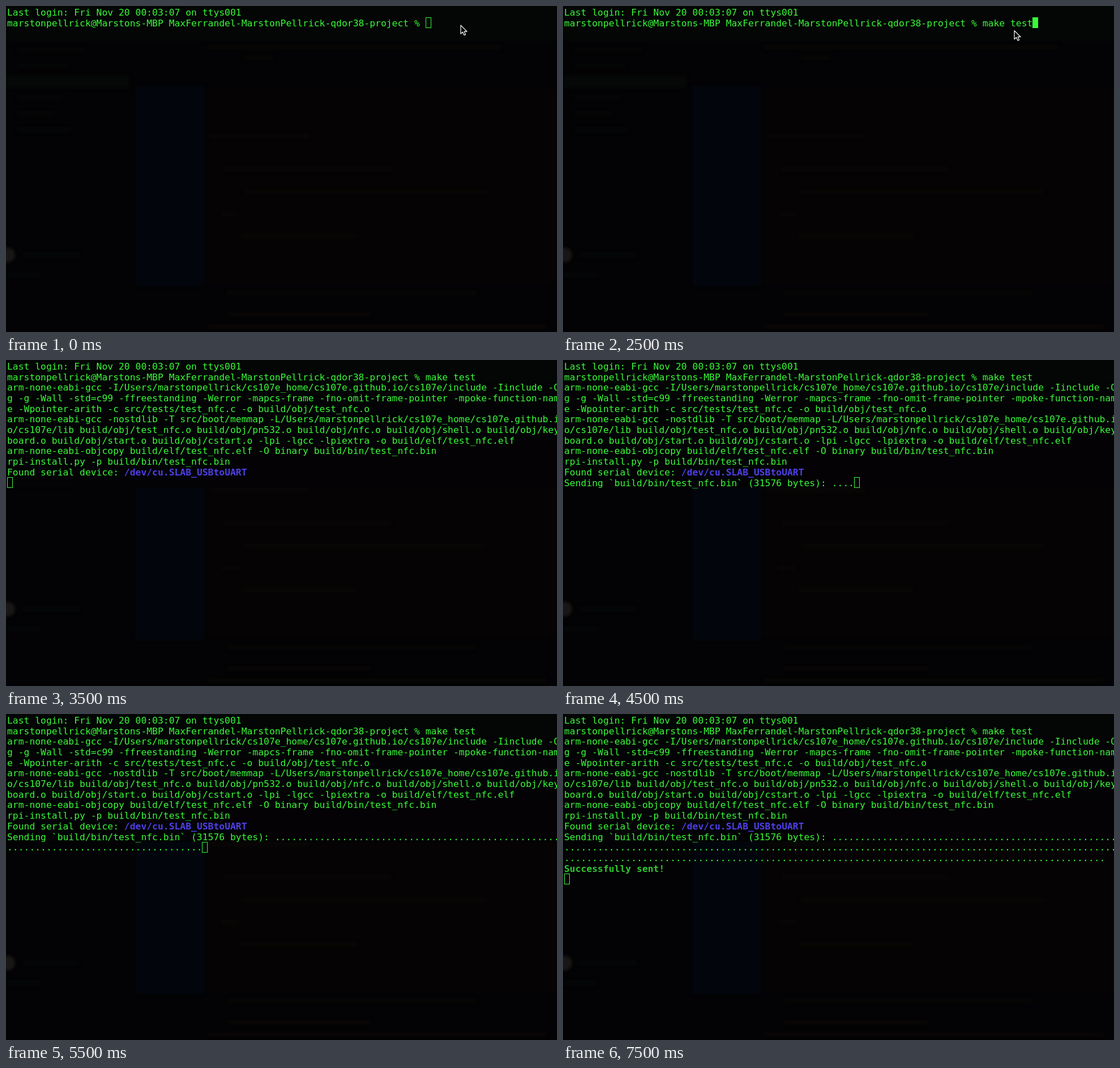
Write an HTML page that moves like this. It is 973x576 px and loops after 8000 ms.

```html
<!DOCTYPE html>
<html lang="en">
<head>
<meta charset="utf-8">
<title>Terminal</title>
<style>
html, body { margin: 0; width: 100%; height: 100%; overflow: hidden; background: #030204; }
#stage { position: relative; width: 973px; height: 576px; overflow: hidden; background: #030204; }
#stage > * { position: absolute; }
#back, #term { left: 0; top: 0; }
#shade { left: 0; top: 39px; width: 973px; background: rgba(4, 3, 5, .85); }
.row {
  position: absolute; left: 2px; white-space: pre; color: #39fb38;
  font: 16.367px/18.71px "DejaVu Sans Mono", monospace;
  font-variant-ligatures: none;
}
.blue { color: #4f3fe6; font-weight: bold; }
.done { color: #32c832; font-weight: bold; }
#caret { width: 10px; height: 19px; box-sizing: border-box; border: 1px solid #39fb38; }
#caret.solid { background: #39fb38; }
#mouse { left: 0; top: 0; }
</style>
</head>
<body>
<div id="stage">
  <svg id="back" width="973" height="576">
    <defs>
      <filter id="soft" x="-20%" y="-20%" width="140%" height="140%" color-interpolation-filters="sRGB">
        <feGaussianBlur stdDeviation="2.5"/>
      </filter>
    </defs>
    <rect width="973" height="62" fill="#040505"/>
    <rect x="352" y="146" width="621" height="346" fill="#050304"/>
    <g id="smudges" filter="url(#soft)">
      <rect x="0" y="122" width="218" height="24" fill="#060707"/>
      <rect x="228" y="141" width="122" height="354" fill="#02060c"/>
      <circle cx="3" cy="440" r="13" fill="#191715"/>
    </g>
  </svg>
  <div id="shade"></div>
  <div id="term"></div>
  <div id="caret"></div>
  <svg id="mouse" width="16" height="22">
    <path d="M1 1V16.2L4.5 13L7 18.6L9.6 17.4L7.2 12H12Z" fill="#080808" stroke="#e8e8e8" stroke-width="1.3" stroke-linejoin="round"/>
  </svg>
</div>
<script>
const LOOP = 8000, STEP = 250, COLS = 99, CELL = 9.853, PITCH = 18.71;
const $ = id => document.getElementById(id);
const user = 'marstonpellrick';
const home = `/Users/${user}/cs107e_home/cs107e.github.io/cs107e`;
const prompt = `${user}@Marstons-MBP MaxFerrandel-MarstonPellrick-qdor38-project % `;
const obj = name => `build/obj/${name}.o`;

const compile = `arm-none-eabi-gcc -I${home}/include -Iinclude -Og -g -Wall -std=c99 -ffreestanding -Werror` +
  ' -mapcs-frame -fno-omit-frame-pointer -mpoke-function-name -Wpointer-arith' +
  ` -c src/tests/test_nfc.c -o ${obj('test_nfc')}`;
const link = `arm-none-eabi-gcc -nostdlib -T src/boot/memmap -L${home}/lib ` +
  ['test_nfc', 'pn532', 'nfc', 'shell', 'keyboard', 'start', 'cstart'].map(obj).join(' ') +
  ' -lpi -lgcc -lpiextra -o build/elf/test_nfc.elf';
const copy = 'arm-none-eabi-objcopy build/elf/test_nfc.elf -O binary build/bin/test_nfc.bin';
const install = 'rpi-install.py -p build/bin/test_nfc.bin';
const found = 'Found serial device: ', device = '/dev/cu.SLAB_USBtoUART';
const sending = 'Sending `build/bin/test_nfc.bin` (31576 bytes): ';

// [time, value] tables; the last entry reached applies
const typed = [[0, ''], [1250, 'm'], [1500, 'ma'], [1750, 'make'], [2000, 'make '], [2250, 'make te'], [2500, 'make test']];
const output = [[0, 0], [2750, 1], [3000, 2], [3250, 4], [3500, 5]];
const focus = [[0, false], [500, true], [3500, false]];
const mouse = [[0, [802, 33]], [250, [801, 36]], [500, [798, 41]], [750, [796, 42.5]],
  [3250, null], [4750, [924, 7.5]], [5500, null]];
const at = (table, t) => table.filter(e => e[0] <= t).pop()[1];

// faint window contents behind the terminal: x, y, width
const smears = [[20, 77, 120], [20, 105, 90], [20, 162, 80], [20, 190, 65], [20, 219, 95], [30, 440, 100], [0, 475, 60],
  [355, 73, 520], [420, 91, 52], [360, 230, 175], [385, 288, 295], [420, 328, 430], [380, 368, 32],
  [415, 407, 205], [390, 507, 440], [390, 545, 255], [355, 566, 600]];
for (const [x, y, w] of smears) {
  const r = document.createElementNS('http://www.w3.org/2000/svg', 'rect');
  const set = { x, y: y - 4, width: w, height: 8, fill: x < 300 ? '#050707' : '#080705' };
  for (const k in set) r.setAttribute(k, set[k]);
  $('smudges').append(r);
}

const wrap = s => s.match(new RegExp(`.{1,${COLS}}`, 'g')) || [''];

function screen(t) {
  const rows = [['Last login: Fri Nov 20 00:03:07 on ttys001'], [prompt + at(typed, t)]];
  const add = (s, cls) => wrap(s).forEach(part => rows.push([part, cls]));
  const n = at(output, t);
  [compile, link, copy, install].slice(0, n).forEach(s => add(s));
  if (n > 4) rows.push([found, '', device]);
  if (t >= 4500) {
    const dots = t >= 7500 ? 247 : Math.round(45 + 20.5 * (t - 5000) / STEP);
    add(sending + '.'.repeat(dots));
  }
  if (t >= 7500) add('Successfully sent!', 'done');
  const open = !n || (t >= 4500 && t < 7500);
  if (!open) rows.push(['']);
  return rows;
}

function span(text, cls) {
  const s = document.createElement('span');
  s.textContent = text;
  if (cls) s.className = cls;
  return s;
}

function draw(t) {
  const rows = screen(t);
  $('term').replaceChildren(...rows.map(([text, cls, tail], i) => {
    const d = document.createElement('div');
    d.className = 'row';
    d.style.top = 2.8 + i * PITCH + 'px';
    d.append(span(text, cls));
    if (tail) d.append(span(tail, 'blue'));
    return d;
  }));
  const last = rows.length - 1;
  const caret = $('caret');
  caret.style.left = Math.round(1.6 + rows[last][0].length * CELL) + 'px';
  caret.style.top = Math.round(1.3 + last * PITCH) + 'px';
  caret.className = at(focus, t) ? 'solid' : '';
  $('shade').style.height = Math.min(10, last - 1) * PITCH + 'px';
  const p = at(mouse, t);
  $('mouse').style.display = p ? '' : 'none';
  if (p) $('mouse').style.transform = `translate(${p[0]}px, ${p[1]}px)`;
}

const start = performance.now();
let shown = -1;
function tick() {
  const t = Math.floor((performance.now() - start) % LOOP / STEP) * STEP;
  if (t !== shown) draw(shown = t);
  requestAnimationFrame(tick);
}
tick();
</script>
</body>
</html>
```
